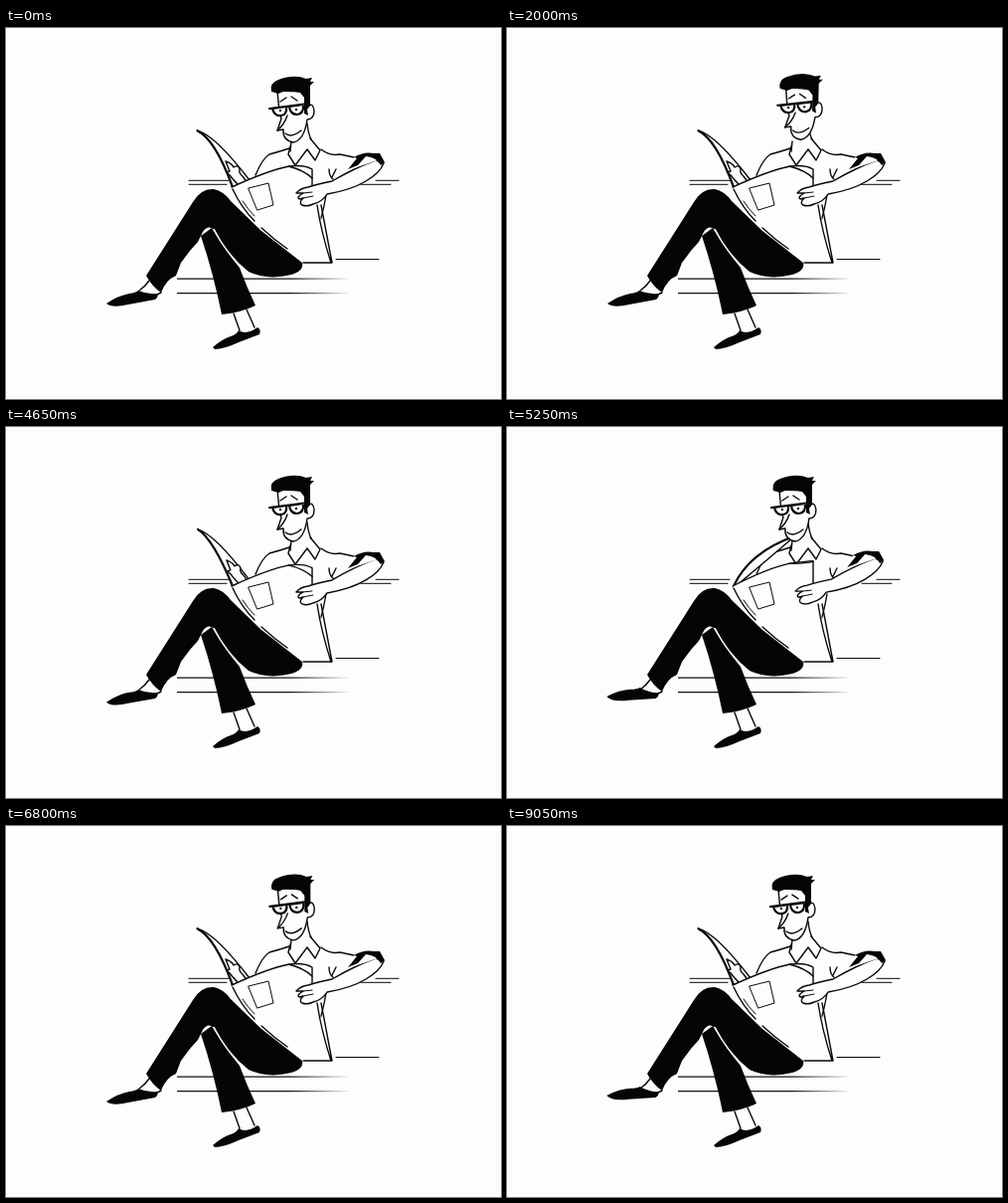
Write an HTML page that moves like this. It is 498 px wide and 373 px high and loops after 9.1 s.

```html
<!DOCTYPE html>
<html lang="en">
<head>
<meta charset="utf-8">
<title>Man reading on a bench</title>
<style>
  html, body { margin: 0; width: 100%; height: 100%; overflow: hidden; background: #fdfefc; }
  svg { display: block; width: 100vw; height: 100vh; }
  .line, .paper { fill: none; stroke: #080808; stroke-width: 1.4; stroke-linecap: round; stroke-linejoin: round; }
  .paper, .fill { fill: #fdfefc; }
  .ink { fill: #050505; }
  .thin { stroke-width: 1; }
  .bold { stroke-width: 2.2; }
</style>
</head>
<body>
<svg viewBox="0 0 498 373">
  <defs>
    <linearGradient id="fade" gradientUnits="userSpaceOnUse" x1="172" x2="347" y1="0" y2="0">
      <stop offset=".65" stop-color="#111"/>
      <stop offset="1" stop-color="#111" stop-opacity="0"/>
    </linearGradient>
  </defs>

  <g id="bench">
    <path class="line thin" d="M184 153.3H224M372 153.3H395M184 157.3H222M357 157.3H387M332 232.5H375"/>
    <path d="M172 251.5H345V252.8H172ZM172 266H347V267.2H172Z" fill="url(#fade)"/>
  </g>

  <g id="torso">
    <path class="fill" d="M252 150Q256 130 268 126L287 121 289 110 306 98 308 113 352 130 326 158 318 200 270 200Z"/>
    <path class="line" d="M251 148Q258 131 265 127Q276 124 285 121M317 122Q326 129 336 127L350 130M322 168Q319 185 316 194M325 142Q325 149 329 152M332 142L328 150"/>
    <path class="line" d="M287 114L286 124M303 96Q304 106 307 112"/>
    <path class="line" d="M286 119L284 127 291 138 303 122M306 111L316 123 311 133 303 122"/>
  </g>

  <path id="leaf" class="paper"/>
  <path id="leafRim" class="line bold"/>
  <path id="leftHand" class="paper" d="M221 134Q227 136 229 140Q234 137 235 142Q234 146 238 149L243 156 234 158Q228 152 226 149L222 145 225 144Z"/>

  <g id="legs">
    <path class="ink" d="M141 249L188 175Q196 161 209 162Q219 164 226 174L257 204 298 236Q300 244 287 248Q263 254 244 245Q226 233 210 203Q203 197 198 205L193 215 185 224 176 236 171 249Q161 253 156 266Q147 260 141 249Z"/>
    <path class="ink" d="M196 209L207 201Q219 222 235 241Q242 260 251 279Q237 286 217 288Q209 248 196 209Z"/>
    <path d="M209 202Q222 228 243 245" fill="none" stroke="#fdfefc" stroke-width="1.2"/>
    <path class="line" d="M229 287L235 304M242 283L250 301"/>
    <path class="ink" d="M208 321Q217 313 226 310Q232 308 234 304Q242 309 253 301Q257 303 255 308L234 316Q219 323 210 323Z"/>
  </g>
  <path class="line" d="M144 254Q140 260 134 264M156 266L152 268"/>
  <path id="foot" class="ink" d="M101 277Q113 269 124 267Q131 266 133 264Q142 268 152 267Q154 270 150 273L123 278Q107 282 101 277Z"/>

  <path id="front" class="fill"/>
  <path id="frontTop" class="line"/>
  <path id="crease" class="line"/>
  <g id="pages">
    <path class="line" d="M228 162Q237 181 250 194M257 201Q270 213 283 222M313 178Q317 205 327 236L299 236M317 178Q322 205 328 236"/>
    <path class="line thin" d="M238 174Q243 182 250 189M244 161L264 156 269 178 253 183Z"/>
  </g>

  <g id="arm">
    <path class="paper" d="M372 133Q352 140 328 154Q313 157 304 160Q296 161 292 166L299 166Q292 170 295 172L299 171Q294 176 298 178Q303 180 309 177Q318 175 323 167Q347 163 362 154Q376 146 380 136Z"/>
    <path class="line thin" d="M299 166L308 165M299 171L309 169"/>
    <path class="fill" d="M350 130L376 127 374 133 344 143Z"/>
    <path class="ink" d="M350 130Q360 124 370 126L376 126 381 135 377 138Q373 130 362 129L354 138 344 142 353 131Z"/>
  </g>

  <g id="head">
    <path class="paper" d="M273 63L275 85 277 91 273 103 279 102Q278 113 289 115Q300 113 303 92Q310 92 310 83Q309 75 304 78L303 64Z"/>
    <path class="ink" d="M267 64Q265 55 274 52Q290 46 302 51L308 50 306 54 310 54 306 58 306 78 303 82 304 88 300 86 300 70 296 65Q282 61 274 66Z"/>
    <path class="line" d="M283 88Q280 97 273 103M281 106Q287 111 297 103M276 74L282 70M287 69L293 73"/>
    <path class="paper bold" d="M268 81L282 79Q283 87 277 88Q270 89 268 81ZM285 79L299 77Q300 86 293 87Q286 87 285 79ZM265 81L304 76"/>
    <g id="eyes" class="ink"><circle cx="276" cy="83" r="1.2"/><circle cx="292" cy="82" r="1.2"/></g>
  </g>
</svg>

<script>
const CYCLE = 4550, STEP = 50;
const el = id => document.getElementById(id);
const set = (id, name, value) => el(id).setAttribute(name, value);
const mix = (a, b, p) => a + (b - a) * p;

function ramp(t, from, to) {
  const p = Math.min(1, Math.max(0, (t - from) / (to - from)));
  return p * p * (3 - 2 * p);
}

// Rises between a and b, falls between c and d.
const pulse = (t, a, b, c, d) => ramp(t, a, b) - ramp(t, c, d);

// A point seen from the spine of the newspaper.
function fromSpine(radius, degrees) {
  const angle = degrees * Math.PI / 180;
  return `${228 + radius * Math.cos(angle)} ${160 + radius * Math.sin(angle)}`;
}

// turn: 0 is the open left page, 1 is the page folded over to the right.
function drawPaper(turn) {
  const angle = -122 + 95 * turn ** 1.6;
  const reach = 67 + 16 * turn ** 3;
  const bend = mix(12, -26, Math.min(1, turn * 2));
  const tip = fromSpine(reach, angle);
  const outer = fromSpine(reach * (.76 - .34 * turn * turn), angle + bend);
  const inner = fromSpine(reach * mix(.83, .57, turn), angle + 13 * (1 - turn));
  const rim = `M228 160Q${outer} ${tip}`;
  set('leaf', 'd', `${rim}Q${inner} ${mix(245, 232, turn)} ${mix(153, 158, turn)}`);
  set('leafRim', 'd', rim);

  const crest = 139 - 2 * turn, corner = 142 - 8 * turn;
  const top = `M227 160Q264 ${crest + 4} 285 ${crest}Q300 ${crest - 2} 308 ${corner}`;
  set('front', 'd', `${top}L313 178 328 236 299 236 283 221 250 194Z`);
  set('frontTop', 'd', `${top}L308 158`);
  set('crease', 'd', `M284 ${crest}Q300 ${crest + 4 - 4 * turn} 308 ${corner + 9 * (1 - turn)}`);
  set('arm', 'transform', `translate(${-2 * turn} ${-turn})`);
  set('leftHand', 'transform', `translate(${22 * turn} ${-4 * turn})`);
  set('leftHand', 'visibility', turn > .7 ? 'hidden' : 'visible');
}

function draw(now) {
  const t = Math.floor(now / STEP) * STEP % CYCLE;
  const turn = pulse(t, 0, 850, 900, 1700);
  const lean = pulse(t, 850, 1350, 1800, 2300);
  const bob = pulse(t, 3900, 4200, 4200, CYCLE);
  const lift = pulse(t, 0, 700, 1350, 1950) + ramp(t, 2900, 3650);
  const glance = pulse(t, 2500, 2900, 2900, 3700);

  drawPaper(turn);
  set('head', 'transform', `translate(${10 * lean + turn - bob} ${bob - 4 * lean}) rotate(${2 * lean} 295 112)`);
  set('foot', 'transform', `rotate(${7 * lift} 150 268)`);
  set('eyes', 'transform', `translate(${-1.5 * glance} 0)`);
}

let start;
function tick(now) {
  start ??= now;
  draw(now - start);
  requestAnimationFrame(tick);
}
draw(0);
requestAnimationFrame(tick);
</script>
</body>
</html>
```
